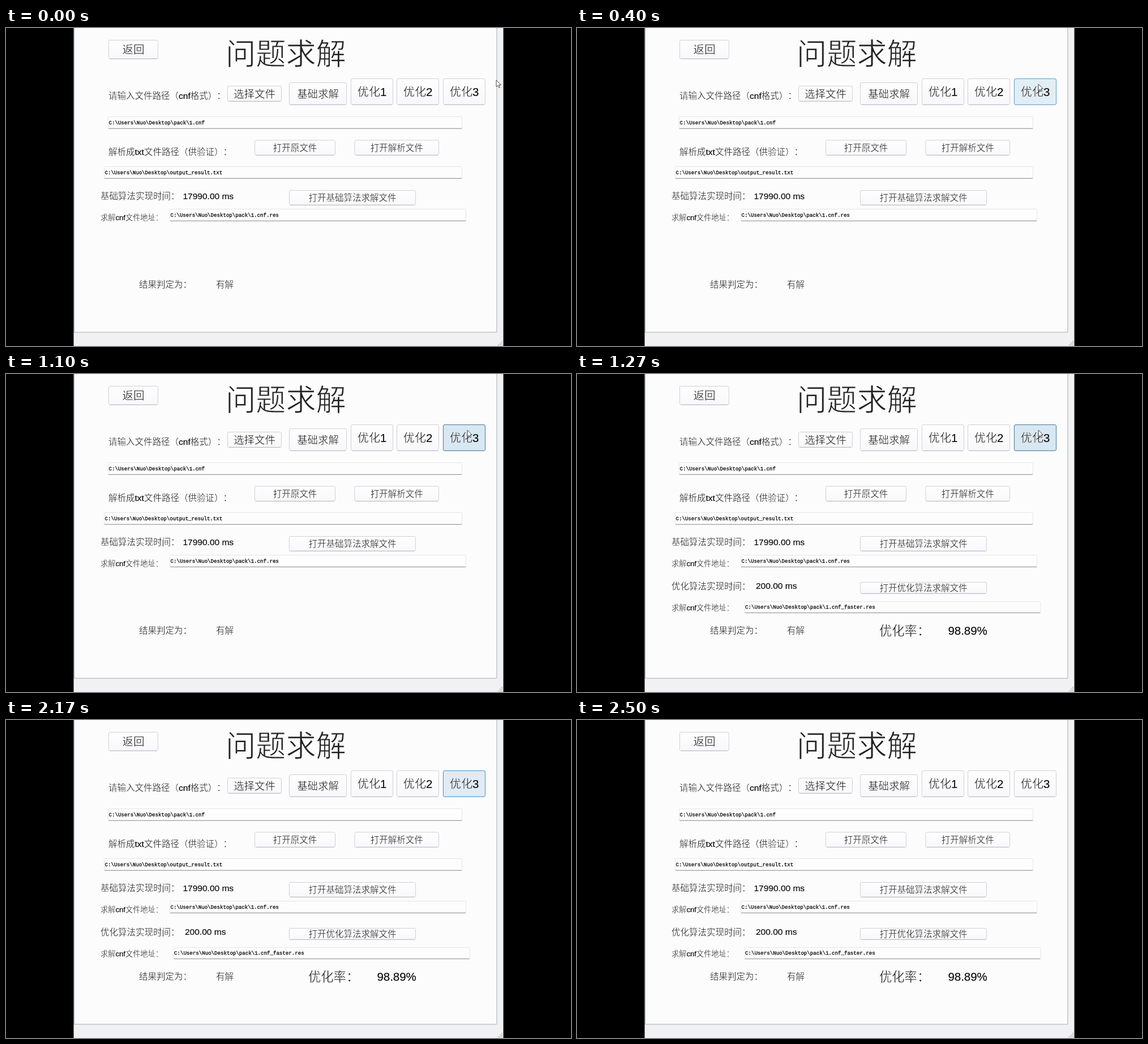
An HTML page for the animation above (2530 ms loop, 998x561 px).

```html
<!DOCTYPE html>
<html lang="zh-CN">
<head>
<meta charset="utf-8">
<title>问题求解</title>
<style>
html, body { margin: 0; width: 100%; height: 100%; overflow: hidden; background: #000; }
svg { display: block; width: 100vw; height: 100vh; }
text {
  font-family: "Liberation Sans", "Noto Sans CJK SC", "Noto Sans CJK", sans-serif;
  font-weight: 300;
  font-kerning: none;
  text-spacing-trim: space-all;
  font-feature-settings: "chws" 0, "halt" 0;
  white-space: pre;
  fill: #222;
  stroke: #fcfcfd;
  stroke-width: .02em;
}
.latin { fill: #0c0c0c; stroke: #0c0c0c; stroke-width: .2px; }
.path { font-family: "Liberation Mono", monospace; font-weight: 400; }
.path .latin { stroke-width: .3px; }
.btn { fill: url(#face); stroke: #cfd1d6; }
.hot { opacity: 0; animation: glow 2530ms linear infinite; }
#late { visibility: hidden; animation: appear 2530ms step-end infinite; }
#cursor { animation: move 2530ms linear infinite; }

@keyframes glow {
  0%, 2.8% { opacity: 0; fill: #e3eff6; stroke: #6fa8c8; }
  6.72% { opacity: .8; fill: #e6f0f7; stroke: #6fa8c8; }
  11%, 29% { opacity: 1; fill: #e2eef6; stroke: #5f9fc4; }
  31.6% { opacity: 1; fill: #dae9f3; stroke: #4f8fb5; }
  36%, 50.2% { opacity: 1; fill: #d8e8f3; stroke: #4a778f; }
  58%, 70% { opacity: 1; fill: #e1edf5; stroke: #4f94bd; }
  83%, 85.8% { opacity: 1; fill: #e0ebf5; stroke: #4a92c6; }
  96%, 100% { opacity: 0; fill: #e3eff6; stroke: #6fa8c8; }
}
@keyframes appear {
  0% { visibility: hidden; }
  47.4%, 100% { visibility: visible; }
}
@keyframes move {
  0%, 1.2% { transform: translate(866px, 92px); }
  6.72% { transform: translate(817px, 93px); }
  11%, 80% { transform: translate(815px, 99px); }
  84.2% { transform: translate(868px, 97px); }
  85.5%, 100% { transform: translate(884px, 97px); }
}
</style>
</head>
<body>
<svg viewBox="0 0 998 561" preserveAspectRatio="none">
  <defs>
    <linearGradient id="face" x1="0" y1="0" x2="0" y2="1">
      <stop offset="0" stop-color="#fefefe"/>
      <stop offset="1" stop-color="#f8f8fc"/>
    </linearGradient>
    <clipPath id="screen"><path d="M120 0H878.5V561H120z"/></clipPath>
  </defs>
  <rect width="998" height="561"/>
  <rect x="119.5" width="759" height="561" fill="#f1f1f3"/>
  <rect x="120" width="747" height="537" fill="#fcfcfd"/>
  <path d="M120.5 0V537M120 536.8H866.8V0" fill="none" stroke="#a3b1b6"/>
  <g id="grip" fill="#b4b4b4"></g>
  <g id="base"></g>
  <g id="late"></g>
  <g clip-path="url(#screen)">
    <path id="cursor" d="M0 0V11.6L2.7 9.2L4.6 13.3L6.5 12.5L4.7 8.4H8.2Z" fill="#fff" stroke="#333" stroke-width=".9"/>
  </g>
</svg>
<script>
const NS = 'http://www.w3.org/2000/svg';
const home = 'C:\\Users\\Nuo\\Desktop\\';
let layer;

function add(tag, attrs, parent = layer) {
  const el = document.createElementNS(NS, tag);
  for (const key in attrs) el.setAttribute(key, attrs[key]);
  return parent.appendChild(el);
}

// cy is the vertical middle of the glyphs; Latin runs are drawn darker
function text(str, x, cy, size, attrs = {}) {
  const el = add('text', { x, y: cy + size * .37, 'font-size': size, ...attrs });
  for (const run of str.match(/[\x20-\x7e]+|[^\x20-\x7e]+/g))
    add('tspan', run < '\x7f' ? { class: 'latin' } : {}, el).textContent = run;
}

function button(label, x1, y1, x2, y2, size, hot) {
  const box = { x: x1 + .4, y: y1 + .5, width: x2 - x1 - 1, height: y2 - y1 - 1.2, rx: 2.5 };
  add('rect', { ...box, class: 'btn' });
  add('path', { d: `M${x1 + 2.5} ${y2 - .7}H${x2 - 2.5}`, stroke: '#b9bbc1' });
  if (hot) add('rect', { ...box, class: 'hot' });
  text(label, (x1 + x2) / 2, (y1 + y2) / 2, size, { 'text-anchor': 'middle' });
}

function field(path, x1, y1, x2, y2) {
  add('rect', { x: x1 + .5, y: y1 + .5, width: x2 - x1 - 1, height: y2 - y1 - 1.2, rx: 1, fill: '#fdfdfd', stroke: '#e6e6e8' });
  add('path', { d: `M${x1 + 1} ${y2 - .7}H${x2 - 1}`, stroke: '#8d8d8f' });
  text(home + path, x1 + 1.5, (y1 + y2) / 2, 9.12, { class: 'path', dy: -.6 });
}

layer = document.getElementById('base');
button('返回', 181, 21, 269, 55, 19.6);
text('问题求解', 388, 45, 53.2);
text('请输入文件路径（cnf格式）：', 181, 119.5, 15.5);
button('选择文件', 391, 102, 487, 130, 18.4);
button('基础求解', 500, 96, 602, 136, 18.4);
button('优化1', 609, 89, 684, 136, 20.2);
button('优化2', 690, 89, 765, 136, 20.2);
button('优化3', 772, 89, 847, 136, 20.2, true);
field('pack\\1.cnf', 180, 156, 806, 178);
text('解析成txt文件路径（供验证）：', 181, 218, 15.5);
button('打开原文件', 439, 197.5, 582, 225, 15.5);
button('打开解析文件', 615.5, 197.5, 765, 225, 15.5);
field('output_result.txt', 173, 244, 806, 266);
text('基础算法实现时间：', 167, 296.5, 15.5);
text('17990.00 ms', 312.5, 296, 15.5);
button('打开基础算法求解文件', 500, 286, 724, 313, 15.5);
text('求解cnf文件地址：', 167, 334, 13.2);
field('pack\\1.cnf.res', 289, 319, 813, 341);
text('结果判定为：', 235, 452.5, 15.5);
text('有解', 371, 452.5, 15.5);

layer = document.getElementById('late');
text('优化算法实现时间：', 167, 374, 15.5);
text('200.00 ms', 316, 373.5, 15.5);
button('打开优化算法求解文件', 500, 367, 724, 388, 15.5);
text('求解cnf文件地址：', 167, 412, 13.2);
field('pack\\1.cnf_faster.res', 295.5, 401, 819.5, 422);
text('优化率：', 534, 453, 22.3);
text('98.89%', 655.5, 452, 20.4);

layer = document.getElementById('grip');
for (let row = 0; row < 3; row++)
  for (let col = 0; col <= row; col++)
    add('rect', { x: 875 - col * 3, y: 552 + row * 3, width: 1.8, height: 1.8 });
</script>
</body>
</html>
```
